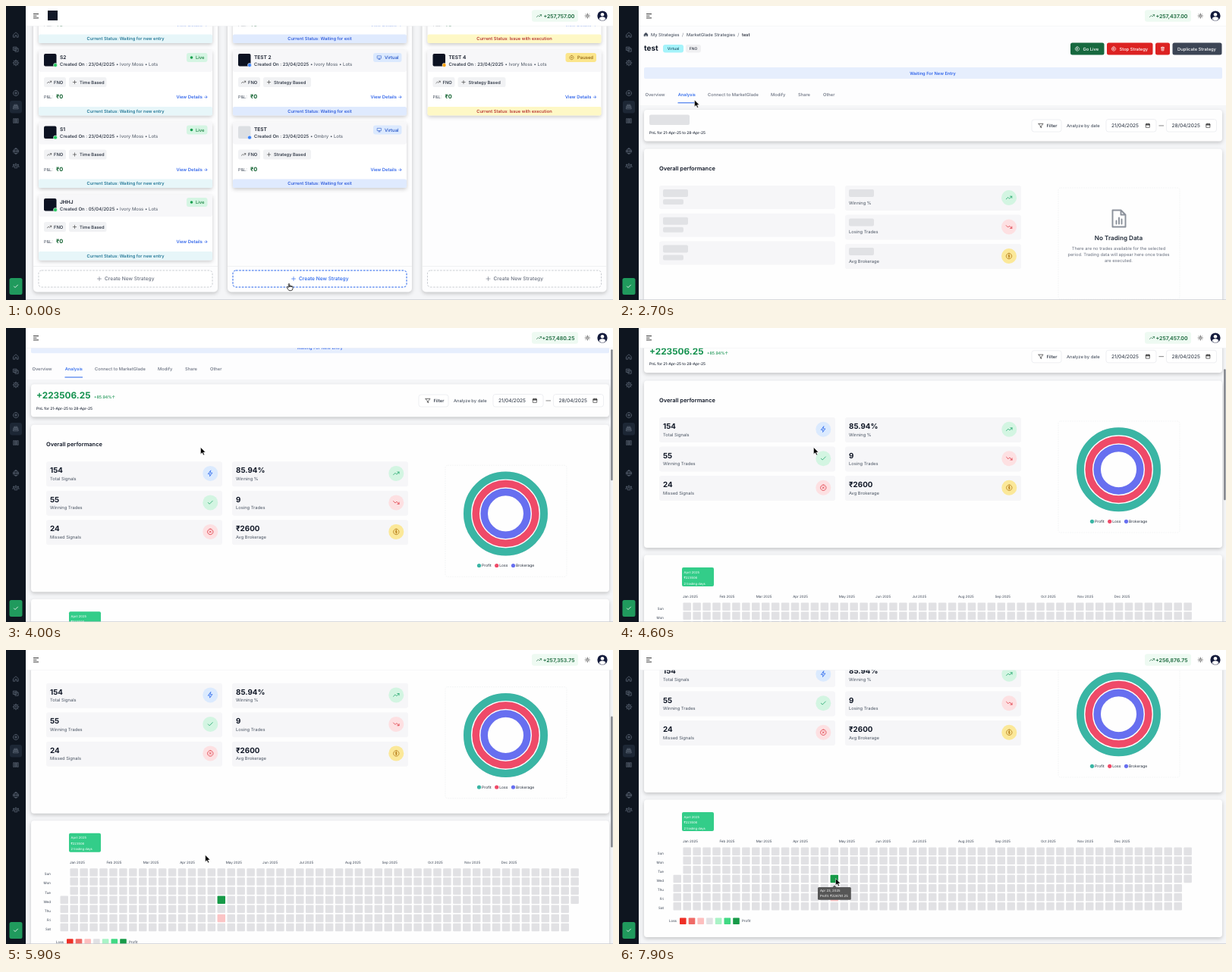
Write an HTML page that moves like this. It is 800 px wide and 388 px high and loops after 8000 ms.

```html
<!DOCTYPE html>
<html lang="en">
<head>
<meta charset="utf-8">
<title>Strategy dashboard</title>
<style>
html, body { margin: 0; height: 100%; overflow: hidden; background: #f4f5f7; }
svg { display: block; width: 100vw; height: 100vh; font-family: Inter, sans-serif; text-rendering: geometricPrecision; }
.card { filter: drop-shadow(0 2px 2.5px #0003); }
.new { color: #6b7280; --edge: .35; }
.hot { color: #2563eb; --edge: 1; }
.new rect { fill: #fff; stroke: currentColor; stroke-opacity: var(--edge); stroke-dasharray: 2.6 1.6; }
</style>
</head>
<body>
<script>
const LOOP = 8000;
const ring = 'M12 2a10 10 0 1 0 .01 0';
const icons = {
  bolt: 'M13 2 4 14h7l-1 8 9-12h-7z',
  check: 'M20 6 9 17l-5-5',
  cross: ring + 'M9 9l6 6m0-6-6 6',
  up: 'M22 7l-8.5 8.5-5-5L2 17M16 7h6v6',
  down: 'M22 17l-8.5-8.5-5 5L2 7M16 17h6v-6',
  coin: ring + 'M12 6v12M15 9.5c-1-2-6-2-6 .5s6 1.5 6 4-5 2.5-6 .5',
  plus: 'M12 4v16M4 12h16',
  add: ring + 'M12 7v10M7 12h10',
  pause: ring + 'M10 9v6M14 9v6',
  stop: ring + 'M9 9h6v6H9z',
  play: ring + 'M10 8l6 4-6 4z',
  funnel: 'M3 4h18l-7 9v7l-4-2v-5z',
  cal: 'M4 5h16v16H4zM4 8h16M4 10h16M8 2v5M16 2v5',
  trash: 'M4 6h16M9 6V3h6v3M6 6l1 15h10l1-15M10 10v7M14 10v7',
  screen: 'M3 4h18v12H3zM8 21h8M12 16v5',
  home: 'M3 11 12 3l9 8v10h-6v-7H9v7H3z',
  copy: 'M3 4h12v12H3zM15 9h6v12H9v-5M9 7v6M6 10h6',
  gear: 'M12 4a8 8 0 1 0 .01 0M12 9a3 3 0 1 0 .01 0M12 1v3M12 20v3M1 12h3M20 12h3M4 4l2 2M18 18l2 2M4 20l2-2M18 6l2-2',
  stack: 'M7 4h10v4H7zM4 9h16v4H4zM3 15h18v5H3z',
  bars: 'M4 4h3v16H4zM11 4h3v16h-3zM18 4h3v16h-3z',
  globe: ring + 'M2 12h20M12 2c-6 6-6 14 0 20M12 2c6 6 6 14 0 20',
  people: 'M12 5a3 3 0 1 0 .01 0M7 20v-4q0-3 5-3t5 3v4zM4 8a2 2 0 1 0 .01 0M20 8a2 2 0 1 0 .01 0M1 18v-4h3M23 18v-4h-3',
  sun: 'M12 8a4 4 0 1 0 .01 0M12 2v3M12 19v3M2 12h3M19 12h3M5 5l2 2M17 17l2 2M5 19l2-2M17 7l2-2',
  doc: 'M4 1h11l6 6v16H4zM15 1v6h6M9 19v-4M12.500 19v-8M16 19v-6'
};

const R = (x, y, w, h, fill, r = 0, more = '') =>
  `<rect x="${x}" y="${y}" width="${w}" height="${h}" rx="${r}" fill="${fill}" ${more}/>`;
const C = (x, y, r, fill, more = '') => `<circle cx="${x}" cy="${y}" r="${r}" fill="${fill}" ${more}/>`;
// y is the middle of the capitals
const T = (x, y, s, size, fill = '#111827', weight = 400, anchor = 'start', more = '') =>
  `<text x="${x}" y="${y + size * .36}" font-size="${size}" fill="${fill}" font-weight="${weight}" text-anchor="${anchor}" ${more}>${s}</text>`;
const I = (name, x, y, size, color, width = 2, fill = 'none') =>
  `<path d="${icons[name]}" transform="translate(${x - size / 2} ${y - size / 2}) scale(${size / 24})" fill="${fill}" stroke="${color}" stroke-width="${width}" stroke-linejoin="round" stroke-linecap="round"/>`;
const G = (id, s) => `<g id="${id}">${s}</g>`;
const map = (n, f) => Array.from({ length: n }, (_, i) => f(i)).join('');

// strategy list
const states = {
  Live: { w: 27.5, pill: '#d5f5e3', ink: '#15803d', dot: '#22c55e', strip: '#e7f6f9', note: '#0e6a8c', text: 'Waiting for new entry' },
  Virtual: { w: 37.5, pill: '#dbe9fe', ink: '#1e4fc4', dot: '#3b82f6', strip: '#dfeafe', note: '#1d4ed8', text: 'Waiting for exit', icon: 'screen' },
  Paused: { w: 40.5, pill: '#fbe58b', ink: '#8a5a0b', dot: '#f59e0b', strip: '#fef8c6', note: '#b02020', text: 'Issue with execution', icon: 'pause' }
};

function strategy(x, y, state, tag, name = '', date = '23/04/2025', broker = 'Ivory Moss', logo = '#0c1222') {
  const s = states[state], left = x + 229.5 - s.w, gray = '#f1f2f4';
  return R(x + 7, y, 229, 86.5, '#fff', 3, 'class="card"') +
    R(x + 7, y, 229, 29, '#f7f7f9', 3) +
    R(x + 14, y + 5, 16.5, 16.5, logo, 2) + C(x + 29, y + 20, 2.5, s.dot, 'stroke="#fff" stroke-width=".6"') +
    T(x + 35, y + 9.5, name, 6.6, '#111827', 600) +
    T(x + 35, y + 18.5, `<tspan font-weight="500" fill="#222b3a">Created On : ${date}</tspan> • ${broker} • Lots`, 6, '#4b5563') +
    R(left, y + 4, s.w, 12, s.pill, 3) +
    (s.icon ? I(s.icon, left + 8, y + 10, 6.5, s.ink) : C(left + 6.5, y + 10, 1.8, '#15a04f')) +
    T(x + 225.5, y + 10, state, 5.9, s.ink, 500, 'end') +
    R(x + 14, y + 36, 29, 13, gray, 2.5) + I('up', x + 21, y + 42.5, 6.5, '#222') + T(x + 27, y + 42.5, 'FNO', 5.8, '#222b3a', 500) +
    R(x + 47, y + 36, tag == 'Time' ? 49.5 : 63, 13, gray, 2.5) + I('plus', x + 54.5, y + 42.5, 6.5, '#222') +
    T(x + 61, y + 42.5, tag + ' Based', 5.8, '#222b3a', 500) +
    T(x + 14, y + 62, 'P&amp;L:', 5.6, '#4b5563') + T(x + 30, y + 61.5, '₹0', 7.4, '#166534', 700) +
    T(x + 230, y + 62, 'View Details →', 5.85, '#1d56e8', 500, 'end') +
    R(x + 7, y + 75, 229, 11.5, s.strip, 2) +
    T(x + 121.5, y + 80.5, 'Current Status: ' + s.text, 5.75, s.note, 500, 'middle');
}

const columns = [36, 292, 548.5], rows = [-37.5, 58, 153.5, 249];
const list = R(26, 26, 774, 362, '#f4f5f7') +
  columns.map((x, i) => R(x, 10, 243, 367.5, '#fdfdfe', 5, 'class="card"') + R(x, 343, 243, .6, '#e8eaed') +
    `<g class="new" ${i == 1 ? 'id="create"' : ''}>${R(x + 7, 349, 229, 22, '', 4)}${I('plus', x + 87, 360, 7.5, 'currentColor')}${T(x + 94, 360, 'Create New Strategy', 6.6, 'currentColor', 500)}</g>`).join('') +
  strategy(36, rows[0], 'Live', 'Time') + strategy(36, rows[1], 'Live', 'Time', 'S2') +
  strategy(36, rows[2], 'Live', 'Time', 'S1') + strategy(36, rows[3], 'Live', 'Time', 'JHHJ', '05/04/2025') +
  strategy(292, rows[0], 'Virtual', 'Strategy') + strategy(292, rows[1], 'Virtual', 'Strategy', 'TEST 2') +
  strategy(292, rows[2], 'Virtual', 'Strategy', 'TEST', '23/04/2025', 'Ombry', '#dcdfe3') +
  strategy(548.5, rows[0], 'Paused', 'Strategy') + strategy(548.5, rows[1], 'Paused', 'Strategy', 'TEST 4');

// strategy page
const button = (x, w, fill, icon, label) => R(x, 48.5, w, 16, fill, 2.5) +
  (icon ? I(icon, x + (label ? 9 : w / 2), 56.5, 6.5, '#fff', 2.4) : '') + (label ? T(x + (icon ? 16.5 : 6.5), 56.5, label, 5.78, '#fff', 500) : '');
const tab = (x, label, id = '') => T(x, 117, label, 5.75, '#6b7280', 500, 'start', id && `id="${id}"`);
const panel = (y, h) => R(33, y, 762, h, '#fefefe', 4, 'class="card"');
const field = (x, s) => R(x, 149.5, 66, 16.5, '#fff', 3, 'stroke="#e3e5e9" stroke-width=".6"') +
  T(x + 7, 158, s, 6.6, '#222b3a') + I('cal', x + 55, 157.7, 7, '#111');
const filters = R(544, 150, 39, 16, '#fff', 3, 'stroke="#e3e5e9" stroke-width=".6"') + I('funnel', 556, 158, 8, '#222') +
  T(563.5, 158, 'Filter', 5.78, '#222b3a', 500) + T(590, 158, 'Analyze by date', 5.78, '#374151') +
  field(642, '21/04/2025') + R(711.5, 157.6, 6.5, .7, '#555') + field(721.5, '28/04/2025');
const period = y => T(40, y, 'PnL for 21-Apr-25 to 28-Apr-25', 4.96, '#222b3a', 500);
const heading = y => T(53, y, 'Overall performance', 7.45, '#111827', 600);

const tones = { blue: ['#dbeafe', '#2563eb'], green: ['#d3f5e2', '#16a064'], red: ['#fde0e2', '#dc2f3a'], gold: ['#fbe899', '#b0740f'] };
const badge = (x, y, icon, tone) => C(x, y, 10, tones[tone][0]) + I(icon, x, y, 9, tones[tone][1], 2);
const tile = (x, y, h = 33) => R(x, y, 232, h, '#f6f6f8', 3);
const bone = (x, y, w, h) => R(x, y, w, h, '#e1e2e5', 2);
const stats = [
  ['154', 'Total Signals', 'bolt', 'blue'], ['85.94%', 'Winning %', 'up', 'green'],
  ['55', 'Winning Trades', 'check', 'green'], ['9', 'Losing Trades', 'down', 'red'],
  ['24', 'Missed Signals', 'cross', 'red'], ['₹2600', 'Avg Brokerage', 'coin', 'gold']
];
const faintBox = y => R(579, y, 160, 147, 'none', 3, 'stroke="#f0f1f3" stroke-width=".7" stroke-dasharray="2 1"');

const waiting = panel(137, 41.5) + bone(40, 143.5, 53, 13.5) + period(167) + filters +
  panel(188.5, 260) + heading(214) +
  map(3, i => tile(53, 237 + 36.7 * i, 31) + bone(58, 242 + 36.7 * i, 33, 10) + bone(58, 255 + 36.7 * i, 27, 7)) +
  map(3, i => {
    const y = 237 + 38.5 * i, [, label, icon, tone] = stats[i * 2 + 1];
    return tile(298, y) + bone(303, y + 5, 33, 10) + T(303, y + 22.5, label, 5.78, '#4b5563') + badge(514, y + 16, icon, tone);
  }) +
  faintBox(240) + I('doc', 658.5, 280.5, 24, '#8b919b', 1.9) +
  T(658.5, 306, 'No Trading Data', 8.15, '#1f2937', 600, 'middle') +
  ['There are no trades available for the selected', 'period. Trading data will appear here once trades', 'are executed.']
    .map((s, i) => T(658.5, 320 + 8 * i, s, 5.78, '#6b7280', 400, 'middle')).join('');

const rings = [[50.5, '#3ab5a4', 'Profit', 623.5], [39.3, '#ef4a68', 'Loss', 646.7], [28.3, '#676ff0', 'Brokerage', 668.5]];
const donut = rings.map(([r, color, name, x], i) => {
  const w = `stroke-width="${i ? 9.5 : 10}"`;
  return C(658.5, 307.7, r, 'none', `stroke="#e4e4e8" ${w}`) +
    C(658.5, 307.7, r, 'none', `class="arc" stroke="${color}" ${w} pathLength="1" transform="rotate(-90 658.5 307.7)"`) +
    C(x, 376.3, 2.6, color) + T(x + 3.6, 376.3, name, 4.96, '#222b3a');
}).join('');

const CELL = 10.5, colX = c => 71.5 + 12.94 * c, rowY = r => 483.5 + 12.1 * r;
// 2025 runs from a Wednesday to a Wednesday, so the end columns are partial
const days = map(365, d => {
  const n = d + 3, c = Math.floor(n / 7), r = n % 7;
  return R(colX(c), rowY(r), CELL, CELL, d == 112 ? '#179a48' : d == 114 ? '#fbc4c5' : '#e1e1e4', 1);
});
const monthAt = { Jan: 0, Feb: 4, Mar: 8, Apr: 12, May: 17, Jun: 21, Jul: 25, Aug: 30, Sep: 34, Oct: 39, Nov: 43, Dec: 47 };
const scale = ['#ee2f26', '#ef6a66', '#fdbfbf', '#e1e1e4', '#a9f3c6', '#40d983', '#179a48'];
const calendar = panel(420.5, 181.5) + R(83, 437, 42, 25, '#33cd89', 2) +
  ['April 2025', '₹223506', '2 trading days'].map((s, i) => T(85.5, 443 + 7.5 * i, s, 4.2, '#fff')).join('') +
  Object.entries(monthAt).map(([m, c]) => T(84 + 12.1 * c, 475.5, m + ' 2025', 4.5, '#374151')).join('') +
  ['Sun', 'Mon', 'Tue', 'Wed', 'Thu', 'Fri', 'Sat'].map((s, i) => T(59, 491 + 12.1 * i, s, 4.5, '#374151', 400, 'end')).join('') +
  days + T(66, 580.5, 'Loss', 4.5, '#374151') + T(162, 580.5, 'Profit', 4.5, '#374151') +
  scale.map((c, i) => R(80 + 11.7 * i, 576.5, 8.6, 8.6, c, .8)).join('');
const tip = G('tip', R(262, 536, 43.8, 16.7, '#565656', 1.5) + '<path d="M281.500 536l2.500-2.500 2.500 2.500z" fill="#565656"/>' +
  T(265, 540.5, 'Apr 23, 2025', 4.3, '#fff') + T(265, 547.5, 'Profit: ₹226781.25', 4.3, '#fff'));

const loaded = panel(137, 43) + T(40, 151.7, '+223506.25', 11.8, '#15924f', 700) + T(116, 153.7, '+85.94%↑', 5.3, '#15924f', 500) +
  period(168.7) + `<g transform="translate(0 .8)">${filters}</g>` + panel(190.5, 220.5) + heading(216.3) +
  stats.map(([value, label, icon, tone], i) => {
    const x = i % 2 ? 298 : 53, y = 239 + 38.5 * (i >> 1);
    return tile(x, y) + T(x + 5, y + 11.5, value, 9.8, '#111827', 700) + T(x + 5, y + 22.7, label, 5.78, '#4b5563') +
      badge(x + 216.3, y + 15.7, icon, tone);
  }).join('') + faintBox(244) + donut + calendar + tip;

const page = R(26, 0, 774, 131, '#fdfdfe') + R(26, 131, 774, 520, '#f5f6f8') +
  I('home', 35.5, 37.5, 6, '#374151', 2, '#374151') + T(42, 37.5, 'My Strategies', 5.78, '#374151') + T(83, 37.5, '/', 5.78, '#6b7280') +
  T(89, 37.5, 'MarketGlade Strategies', 5.78, '#374151') + T(156.3, 37.5, '/', 5.78, '#6b7280') + T(162, 37.5, 'test', 5.78, '#111827', 500) +
  T(33, 55.5, 'test', 9.9, '#111827', 700) +
  R(58, 51, 27, 10.5, '#a5f3fa', 3) + T(71.5, 56.3, 'Virtual', 4.96, '#164e63', 500, 'middle') +
  R(88, 51, 20, 10.5, '#f0f0f2', 3) + T(98, 56.3, 'FNO', 4.96, '#222b3a', 500, 'middle') +
  button(595, 44.5, '#17693f', 'play', 'Go Live') + button(643, 60.5, '#dc2222', 'stop', 'Stop Strategy') +
  button(707, 19, '#dc2222', 'trash') + button(729.5, 65, '#3c4555', '', 'Duplicate Strategy') +
  R(33, 81, 762, 15, '#e6eefd', 2) + T(413.5, 88.5, 'Waiting For New Entry', 5.72, '#1d56e8', 500, 'middle') +
  tab(34.5, 'Overview', 'overview') + tab(77.7, 'Analysis', 'analysis') + tab(117, 'Connect to MarketGlade') +
  tab(200, 'Modify') + tab(236, 'Share') + tab(269, 'Other') + R(77.5, 127.3, 23.5, 1, '#2563eb', 0, 'id="line"') +
  G('wait', waiting) + G('done', loaded);

// frame around the pages
const side = Object.entries({ home: 38, copy: 57, gear: 75, add: 115, stack: 133, bars: 151.5, globe: 191.5, people: 210.5 });
const frame = R(26, 0, 774, 26.3, '#fff') + R(26, 26.3, 774, .5, '#eceef1') + R(0, 0, 26, 388, '#0e151f') +
  R(5, 125, 16, 16.5, '#1d2735', 3) + side.map(([name, y]) => I(name, 13, y, 8.5, '#5d6777', 2.2)).join('') +
  R(4.5, 359, 17, 22, '#209a5d', 2.5) + I('check', 13, 370, 7.5, '#fff', 2.6) +
  R(36, 10, 7, .9, '#222') + R(36, 12.7, 4.5, .9, '#222') + R(36, 15.4, 7, .9, '#222') +
  R(55, 6, 13, 13, '#111827', 0, 'id="brand"') +
  R(693, 5.3, 61, 15.4, '#eefaf2', 3) + I('up', 702.5, 13, 7.5, '#17663a') +
  T(749.5, 13, '', 7, '#17663a', 600, 'end', 'id="total"') + I('sun', 766.3, 13, 7.5, '#222', 2) +
  C(786, 13, 6.6, '#141b3c') + C(786, 11.2, 2.3, '#fff') + '<path d="M781.800 17.500q0-3.300 4.200-3.300t4.200 3.300q-4.200 3.400-8.400 0z" fill="#fff"/>' +
  R(797.2, 0, 2.4, 173, '#7d8087', 1.2, 'id="thumb"') + R(26, 387.3, 774, .7, '#c9cbd0');

const arrow = '<path id="arrow" d="M0 0V9L2.100 7.100 3.600 10.300 5 9.700 3.600 6.500H6.400Z" fill="#000" stroke="#fff" stroke-width=".5"/>';
const hand = '<g id="hand"><path transform="scale(.48) translate(-9.500 -3)" fill="#fff" stroke="#111" stroke-width="1.700" stroke-linejoin="round" d="M8 13V4.500a1.500 1.500 0 0 1 3 0V12v-2.500a1.500 1.500 0 0 1 3 0V12v-1.500a1.500 1.500 0 0 1 3 0V12v-.5a1.500 1.500 0 0 1 3 0V16a6 6 0 0 1-6 6h-2a7 7 0 0 1-5-3l-3.300-5.700a1.500 1.500 0 0 1 2.600-1.500L8 14"/></g>';

document.body.innerHTML = `<svg viewBox="0 0 800 388" preserveAspectRatio="none">${G('list', list)}${G('page', page)}${frame}${G('cursor', arrow + hand)}</svg>`;

const $ = id => document.getElementById(id);
const arcs = document.querySelectorAll('.arc');
const show = (id, on) => $(id).style.display = on ? '' : 'none';
const clamp = v => Math.max(0, Math.min(1, v));
const smooth = u => u * u * (3 - 2 * u);

function along(keys, t, ease = u => u) {
  let i = 0;
  while (i < keys.length - 2 && t >= keys[i + 1][0]) i++;
  const [a, b] = [keys[i], keys[i + 1]], u = ease(clamp((t - a[0]) / (b[0] - a[0])));
  return a.slice(1).map((v, k) => v + (b[k + 1] - v) * u);
}

const scrollKeys = [[3400, 0], [3600, 24], [4600, 121], [5100, 151], [6400, 223]];
const cursorKeys = [[200, 373, 366.5], [1100, 500, 215], [1500, 500, 215], [2400, 99.5, 124], [2800, 99.5, 124],
  [3300, 256.5, 157.5], [5300, 256.5, 157.5], [6300, 266, 332], [6700, 266, 332], [7300, 285.5, 301.5]];
const totalKeys = [[0, 257757], [2700, 257437], [3600, 257495.75], [4600, 257457], [5100, 257512.25], [6500, 257234.75], [7900, 256876.75]];
const OPEN = 1400, SWITCH = 2400, LOADED = 2880;

function draw(now) {
  const t = Math.floor(now % LOOP / 100) * 100;
  const [scroll] = along(scrollKeys, t), [x, y] = along(cursorKeys, t, smooth);
  const opened = t >= OPEN, analysis = t >= SWITCH;

  show('list', !opened); show('brand', !opened); show('page', opened);
  show('hand', !opened); show('arrow', opened);
  show('wait', t < LOADED); show('done', t >= LOADED);
  show('thumb', t >= 3400 && t < 7000); show('tip', t >= 7200);
  $('create').setAttribute('class', y > 349 ? 'new hot' : 'new');

  $('overview').setAttribute('fill', analysis ? '#6b7280' : '#2563eb');
  $('analysis').setAttribute('fill', analysis ? '#2563eb' : '#6b7280');
  $('line').setAttribute('x', analysis ? 77.5 : 34.3);
  $('line').setAttribute('width', analysis ? 23.5 : 27);

  $('page').setAttribute('transform', `translate(0 ${-scroll})`);
  $('thumb').setAttribute('y', scroll * .448);
  $('cursor').setAttribute('transform', `translate(${x} ${y})`);
  arcs.forEach((arc, i) => arc.setAttribute('stroke-dasharray', clamp((t - LOADED - 180 * i) / 700) + ' 2'));

  const total = Math.round(along(totalKeys, t)[0] * 4) / 4;
  $('total').textContent = '+' + total.toLocaleString('en-US', { minimumFractionDigits: 2 });
  requestAnimationFrame(() => draw(performance.now() - start));
}
const start = performance.now();
draw(0);
</script>
</body>
</html>
```
